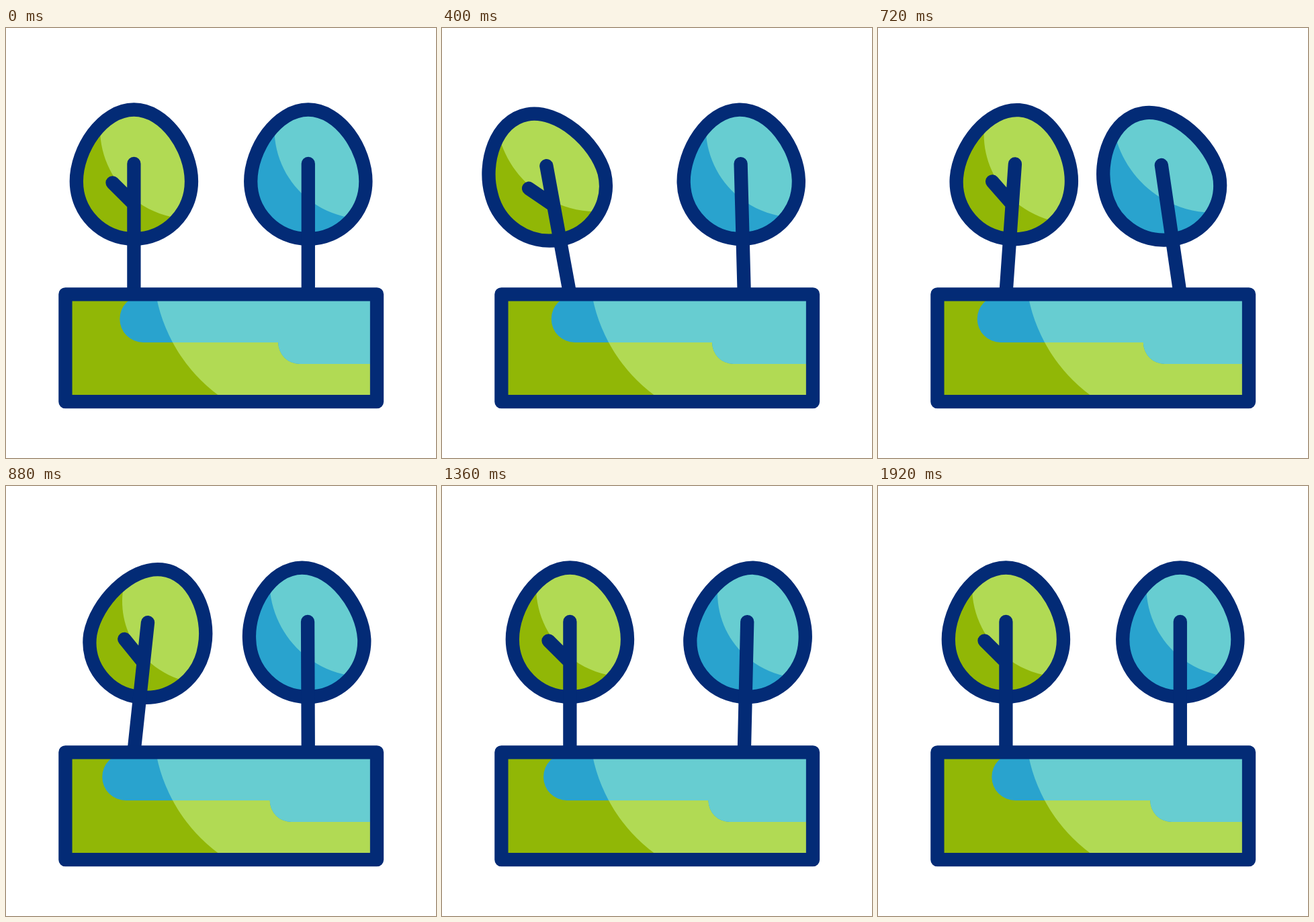
An HTML page for the animation above (2000 ms loop, 640x640 px).

```html
<!DOCTYPE html>
<html lang="en">
<head>
<meta charset="utf-8">
<title>Two swaying trees</title>
<style>
  html, body { margin: 0; width: 100%; height: 100%; overflow: hidden; background: #fff; }
  svg { display: block; width: 100vw; height: 100vh; }
  .line { fill: none; stroke: #032b76; stroke-width: 20.3; stroke-linejoin: round; stroke-linecap: round; }
  .leaf { --dark: #91b706; --light: #b1da54; }
  .water { --dark: #29a3ce; --light: #67cdd1; }
  .dark { fill: var(--dark); }
  .light { fill: var(--light); }
</style>
</head>
<body>
<svg viewBox="0 0 640 640">
  <defs>
    <clipPath id="crown0"><path class="egg"/></clipPath>
    <clipPath id="crown1"><path class="egg"/></clipPath>
    <clipPath id="plot"><rect x="88" y="396" width="464" height="160"/></clipPath>
    <clipPath id="pond"><path id="shore"/></clipPath>
  </defs>

  <g class="tree leaf">
    <path class="egg dark"/>
    <path class="shine light" clip-path="url(#crown0)"/>
    <path class="egg line"/>
    <path class="line" d="M190.4 396V202M190.4 262L158.5 230.3"/>
  </g>

  <g class="tree water">
    <path class="egg dark"/>
    <path class="shine light" clip-path="url(#crown1)"/>
    <path class="egg line"/>
    <path class="line" d="M190.4 396V202"/>
  </g>

  <g clip-path="url(#plot)">
    <g class="leaf">
      <rect class="dark" x="88" y="396" width="464" height="160"/>
      <circle class="light" cx="459" cy="354.4" r="239.6"/>
    </g>
    <g class="water" clip-path="url(#pond)">
      <rect class="dark" x="88" y="396" width="464" height="160"/>
      <circle class="light" cx="459" cy="354.4" r="239.6"/>
    </g>
  </g>
  <rect class="line" x="88.4" y="396.3" width="463.6" height="159.9"/>
</svg>

<script>
const LOOP = 2000, STEP = 40;
const BASE_X = 190.4, BASE_Y = 396;

// Keys are [time, value] pairs, eased in and out between neighbours.
const trees = [
  { x: 0,
    sway: [[60, 0], [400, -10.4], [820, 6.4], [1280, 0]],
    bend: [[130, 0], [530, -19.5], [850, 12.5], [1380, 0]] },
  { x: 259.4,
    sway: [[320, 0], [640, -9.8], [1060, 6], [1490, 0]],
    bend: [[370, 0], [770, -16], [1090, 12.5], [1700, 0]] }
];
const tide = [[140, 0], [940, 1], [1030, 1], [1920, 0]];

function valueAt(keys, t) {
  if (t <= keys[0][0]) return keys[0][1];
  for (let i = 1; i < keys.length; i++) {
    const [t0, a] = keys[i - 1], [t1, b] = keys[i];
    if (t < t1) {
      const u = (t - t0) / (t1 - t0);
      return a + (b - a) * u * u * (3 - 2 * u);
    }
  }
  return keys[keys.length - 1][1];
}

// The higher a point of the crown, the further the bend carries it.
function bender(bend) {
  return (x, y) => {
    const lift = Math.max(0, (290 - y) / 168.5) ** 1.7;
    return `${(x + bend * lift).toFixed(2)} ${y} `;
  };
}

function eggPath(p) {
  const cx = BASE_X, cy = 228.3, r = 85.6, k = 47.3, top = 121.5, low = cy + r;
  return 'M' + p(cx - r, cy) +
    'C' + p(cx - r, cy - k) + p(cx - k, top) + p(cx, top) +
    'C' + p(cx + k, top) + p(cx + r, cy - k) + p(cx + r, cy) +
    'C' + p(cx + r, cy + k) + p(cx + k, low) + p(cx, low) +
    'C' + p(cx - k, low) + p(cx - r, cy + k) + p(cx - r, cy) + 'Z';
}

function shinePath(p) {
  return 'M' + p(140, 150) +
    'C' + p(140, 224) + p(200, 284) + p(274, 284) +
    'L' + p(310, 284) + 'L' + p(310, 100) + 'L' + p(140, 100) + 'Z';
}

function shorePath(flow) {
  const left = 204.3 - 26.5 * flow, step = 405.2 - 12.7 * flow;
  return `M${left} 398A35 35 0 0 0 ${left} 468H${step}` +
    `A32 32 0 0 0 ${step + 32} 500H560V398Z`;
}

const groups = document.querySelectorAll('.tree');
const shore = document.getElementById('shore');
trees.forEach((tree, i) => {
  tree.group = groups[i];
  tree.eggs = [...tree.group.querySelectorAll('.egg'), document.querySelector(`#crown${i} path`)];
  tree.shine = tree.group.querySelector('.shine');
});

function draw(t) {
  for (const tree of trees) {
    const p = bender(valueAt(tree.bend, t));
    const egg = eggPath(p);
    tree.eggs.forEach(e => e.setAttribute('d', egg));
    tree.shine.setAttribute('d', shinePath(p));
    tree.group.setAttribute('transform',
      `translate(${tree.x}) rotate(${valueAt(tree.sway, t)} ${BASE_X} ${BASE_Y})`);
  }
  shore.setAttribute('d', shorePath(valueAt(tide, t)));
}

const start = performance.now();
function tick() {
  const t = (performance.now() - start) % LOOP;
  draw(Math.floor(t / STEP) * STEP);
  requestAnimationFrame(tick);
}
tick();
</script>
</body>
</html>
```
